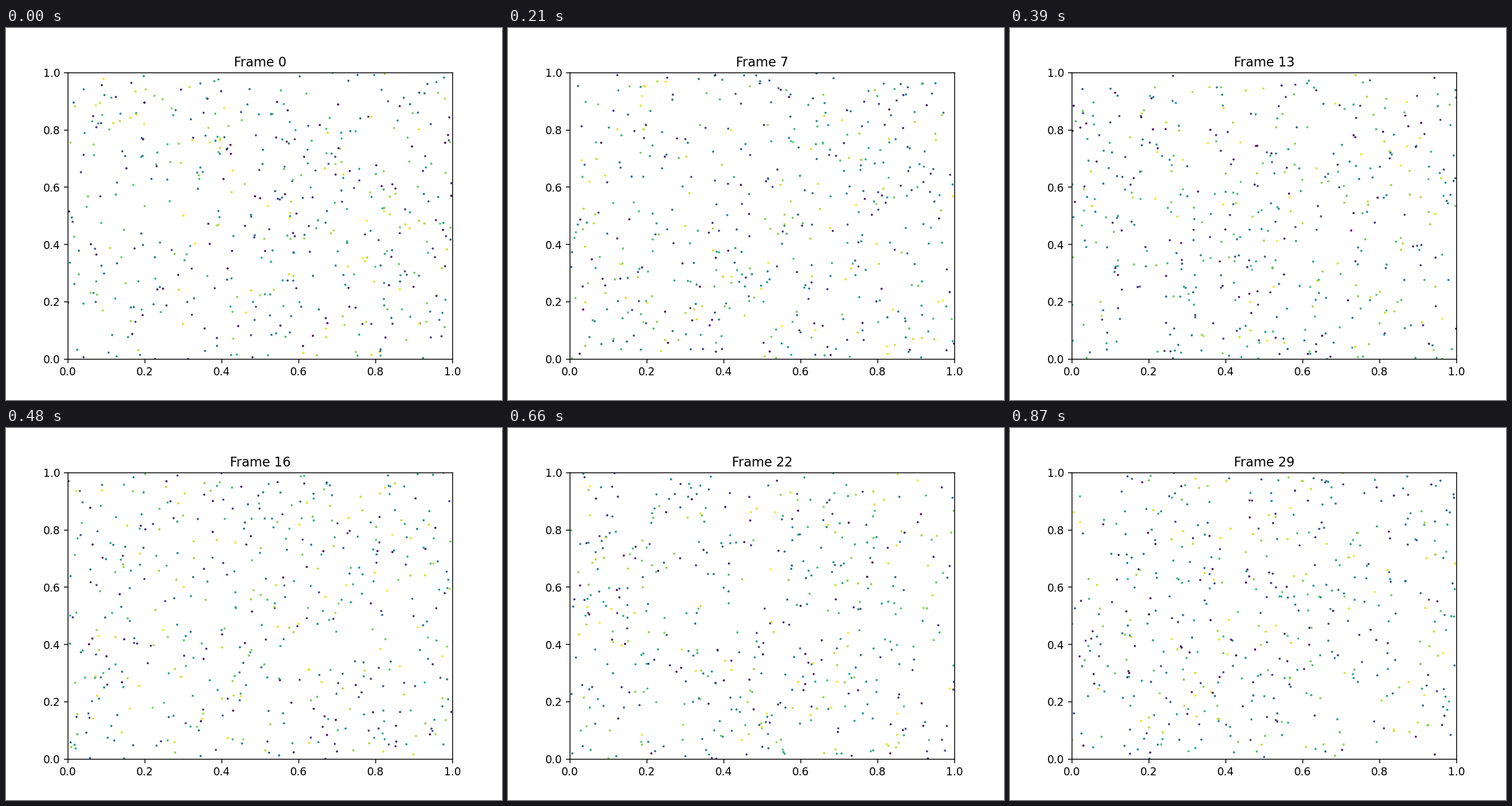
A matplotlib script for the animation above (900 ms loop, 864 px wide and 648 px high).

```python
import numpy as np
import matplotlib.pyplot as plt
from matplotlib.animation import FuncAnimation

FRAMES = 30
INTERVAL = 30  # ms
POINTS = 500

plt.rcParams["font.family"] = "DejaVu Sans"

fig, ax = plt.subplots(figsize=(6.4, 4.8), dpi=135)
ax.set_xlim(0, 1)
ax.set_ylim(0, 1)
dots = ax.scatter([], [], c=[], s=1, cmap="viridis", vmin=0, vmax=1)
title = ax.set_title("Frame 0")


def draw(n):
    """Scatter a fresh, repeatable cloud of points for step n."""
    x, y, shade = np.random.default_rng(n).random((3, POINTS))
    dots.set_offsets(np.column_stack([x, y]))
    dots.set_array(shade)
    title.set_text(f"Frame {n}")
    return dots, title


anim = FuncAnimation(fig, draw, frames=FRAMES, init_func=lambda: draw(0),
                     interval=INTERVAL, repeat=True, repeat_delay=0)
plt.show()
```
